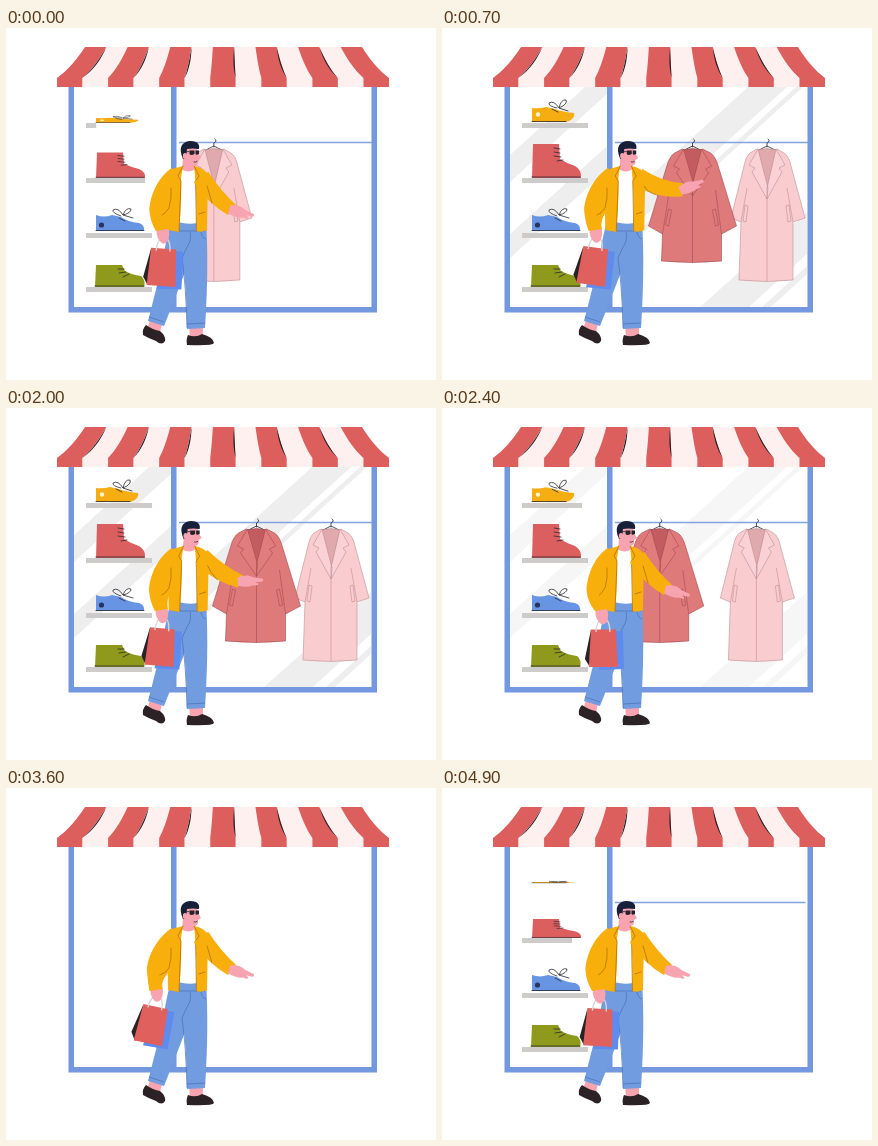
Recreate the animation shown at these times as an HTML page. Size 430x352 px, loop 5000 ms.

```html
<!DOCTYPE html>
<html lang="en">
<head>
<meta charset="utf-8">
<title>Shop window</title>
<style>
html, body { margin: 0; width: 100%; height: 100%; overflow: hidden; background: #fff; }
svg { display: block; width: 100vw; height: 100vh; }
.line { fill: none; stroke: #2b2a33; stroke-width: .8; stroke-linecap: round; stroke-linejoin: round; }
.skin { fill: #f7a3b0; }
.jacket { fill: #f8ae0b; }
.jeans { fill: #719ce0; }
.dark { fill: #2b2226; }
.shelf { fill: #cdcccb; }
.seam { fill: none; stroke: #4a70b5; stroke-width: .7; }
.fold { fill: none; stroke: #a86c08; stroke-width: .7; stroke-linecap: round; }
</style>
</head>
<body>
<svg viewBox="0 0 430 352" preserveAspectRatio="none">
  <defs>
    <clipPath id="glass"><path d="M68 59H165V279H68ZM171 59H365V279H171Z"/></clipPath>
    <clipPath id="room"><path d="M171 59H372V279H171Z"/></clipPath>
  </defs>

  <g id="sheen" clip-path="url(#glass)" fill="#eeeeee">
    <path d="M143 59H165V66L68 154V127Z"/>
    <path d="M165 118V142L68 230V206Z"/>
    <path d="M306 59H345L171 217V182Z"/>
    <path d="M354 59H361L171 232V226Z"/>
    <path d="M365 184V226L307 279H258Z"/>
    <path d="M365 238V246L329 279H320Z"/>
  </g>

  <g id="shelves" class="shelf"></g>
  <g id="shoes">
    <g>
      <path d="M90 80Q97 81 104 79L113 81Q121 84 132 85Q133 88 130 91Q127 94 122 94H90Z" fill="#f6ad12"/>
      <circle cx="96" cy="86.500" r="2.200" fill="#fff3d0"/>
      <path class="line" d="M90 93.500H124M110 81L116 84M115 80Q106 78 107 75Q112 72 117 80Q119 71 124 72Q126 76 117 80L126 83"/>
    </g>
    <g>
      <path d="M91 116H117L118 131Q126 136 133 138Q140 142 139 150H90Z" fill="#dc5f60"/>
      <path class="line" d="M90 149H138M112 120L118 121M112 124L118 125M112 128L119 129M115 133L121 132"/>
    </g>
    <g>
      <path d="M90 187Q98 190 106 187L115 189Q122 194 133 195Q139 197 138 203H90Z" fill="#6795e4"/>
      <circle cx="95.500" cy="197" r="2.600" fill="#26345f"/>
      <path class="line" d="M90 202.500H138M113 190L119 193M115 188Q106 185 107 182Q112 179 117 187Q120 179 125 181Q125 185 117 187L127 190"/>
    </g>
    <g>
      <path d="M90 237H116L119 243Q126 247 135 248Q140 252 138 259H89Z" fill="#8f9a1d"/>
      <path class="line" d="M89 258H138M112 241L118 241M113 245L120 244M117 249L123 246"/>
    </g>
  </g>

  <path id="rack" d="M173 114.500H366" stroke="#83a3de" stroke-width="1.700"/>

  <g clip-path="url(#room)">
    <g id="pink" stroke="#c08d93" stroke-width=".6" fill="#f9cdd0">
      <path class="line" d="M0 119V115Q4 113 1 111M-12 124L0 118L12 124"/>
      <path d="M-10 121L-17 125Q-21 128 -23 138L-36 190L-26 194L-28 252Q0 255 26 252L26 194L38 190L24 138Q22 128 17 125L10 121L0 126Z"/>
      <path d="M-9 122Q0 119 9 122L0 160Z" fill="#e0a9ae"/>
      <path d="M-9 121L-18 137L-12 140L-15 144L0 171L1 160ZM9 121L18 137L12 140L15 144L0 171V160Z" fill="#fad2d5"/>
      <path d="M0 171V253M-26 194L-20 160M26 194L20 160M-22 177L-19 178L-21 194L-24 193ZM22 177L19 178L21 194L24 193Z" fill="none"/>
    </g>
    <g id="red" stroke="#a34a50" stroke-width=".6" fill="#df7a7a">
      <path class="line" d="M0 119V115Q4 113 1 111M-12 124L0 118L12 124"/>
      <path d="M-10 121L-18 125Q-23 128 -26 139L-44 198L-30 206L-31 233Q0 236 29 233L29 206L44 198L26 139Q23 128 18 125L10 121L0 126Z"/>
      <path d="M-9 122Q0 119 9 122L0 156Z" fill="#c35c60"/>
      <path d="M-9 121L-19 138L-13 141L-16 145L0 168L1 156ZM9 121L19 138L13 141L16 145L0 168V156Z" fill="#e07d7c"/>
      <path d="M0 168V235M-30 206L-23 162M29 206L23 162M-24 181L-21 182L-24 198L-27 197ZM23 181L20 182L23 198L26 197Z" fill="none"/>
    </g>
  </g>

  <path d="M62.500 59H68V279H165V59H170.500V279H365.500V59H371V284.500H62.500Z" fill="#7398e0"/>
  <g id="awning"></g>

  <path class="skin" d="M144 292L156 296L154 304L141 302ZM183 296H197V310H184Z"/>
  <path class="dark" d="M140 297Q147 302 154 303Q160 308 159 313Q156 318 150 313Q142 310 137 307Q136 301 140 297ZM182 307Q190 310 196 306Q207 309 208 315Q207 318 181 317Q180 311 182 307Z"/>
  <path class="jeans" d="M165 194H186L188 220Q174 258 158 298L142 293Q151 260 158 226Q161 206 165 194Z"/>
  <path class="jeans" d="M172 194H200Q203 238 199 300L181 301Q181 262 176 226Z"/>
  <path class="seam" d="M184 204Q186 212 181 219L176 230Q180 258 181 300M170 203H199M181 296L199 295M143 289L158 294M195 204Q196 210 200 211"/>

  <g id="torso">
    <path class="skin" d="M177 130H189V143Q183 149 176 143Z"/>
    <path d="M174 140Q183 147 190 140L191 195Q182 197 172 194Z" fill="#fff"/>
    <path class="jacket" d="M177 138Q167 140 161 144L162 202L173 204Q176 170 175 150Z"/>
    <path class="jacket" d="M188 138Q199 140 202 147L201 202Q196 205 190 203Q191 170 189 148Z"/>
    <path class="fold" d="M177 138L172 148L175 153L173 203M188 138L193 148L189.500 153L190.500 203M193 186L199 184"/>
    <path class="skin" d="M178 118H191L192 125L195 130L192 132Q193 138 187 138Q179 137 177 130Z"/>
    <path d="M177 131Q173 122 176 117Q181 111 190 114Q194 116 193 121Q186 120 181 121L180 130Z" fill="#172038"/>
    <ellipse class="skin" cx="179" cy="128" rx="2.200" ry="3"/>
    <path d="M183.500 122.500H188.500V126Q185 128 183.500 126ZM189.500 122.500H193V126Q190 127.500 189.500 126Z" fill="#26222b"/>
    <path class="line" d="M179 124L183 123.500M188 134Q189.500 134.500 191 133.500"/>
    <path id="reachSleeve" class="jacket"/>
    <path id="reachFold" class="fold"/>
  </g>
  <path id="hand" class="skin" d="M-3 -4C4 -6 8 -6 13 -3L22 -1Q24 1 21 2L15 2L18 4Q17 6 12 5Q6 7 -3 4Z"/>

  <g id="bag">
    <path d="M4 13L20 12L21 50L-4 51Z" fill="#5e8bef"/>
    <path d="M-12 11L-18 40L-13 48L-8 46Z" fill="#2b2226"/>
    <path d="M-12 10.500H13L15 48H-14Z" fill="#df605d"/>
    <path d="M-7 13Q-6 0 0 -1Q7 0 7 13" fill="none" stroke="#d9d4d6" stroke-width="1.300"/>
  </g>
  <path id="fist" class="skin" d="M-6 -10L4 -11Q8 -4 5 4Q1 9 -3 4Q-8 -2 -6 -10Z"/>
  <path id="bagSleeve" class="jacket"/>
  <path id="bagFold" class="fold"/>
</svg>

<script>
const LOOP = 5000, STEP = 100;
const $ = id => document.getElementById(id);
const set = (el, name, value) => el.setAttribute(name, value);
const clamp = x => Math.min(1, Math.max(0, x));
const mix = (a, b, k) => a + (b - a) * k;
const smooth = k => k * k * (3 - 2 * k);

function add(parent, attrs) {
  const el = document.createElementNS('http://www.w3.org/2000/svg', 'path');
  for (const name in attrs) set(el, name, attrs[name]);
  parent.append(el);
  return el;
}

// Awning: stripes flare outward from the top edge
function edge(i) {
  const top = 79 + i * 277 / 13, low = 51 + i * 332 / 13, d = low - top;
  const upper = shift => `${top + d * .28 + shift} 31`;
  const lower = shift => `${top + d * .6 + shift} 42`;
  return { top, low,
    down: `C${upper(0)} ${lower(0)} ${low} 50`,
    up: (shift = 0) => `C${lower(shift)} ${upper(shift)} ${top} 19` };
}
for (let i = 0; i < 13; i++) {
  const a = edge(i), b = edge(i + 1);
  add($('awning'), { fill: i % 2 ? '#fdf0ee' : '#dd5f5d',
    d: `M${a.top} 19${a.down}V59H${b.low}V50${b.up()}Z` });
}
for (let i = 1; i < 13; i += 2) {
  const e = edge(i);
  add($('awning'), { fill: '#2b2226', d: `M${e.top} 19${e.down}${e.up(i < 7 ? 1.8 : -1.8)}Z` });
}

// Presence from 0 to 1: leaves at out, returns at back (may lie past the loop end)
function life(t, out, outDur, back, backDur, power = 2) {
  const rise = x => 1 - (1 - clamp((x - back) / backDur)) ** power;
  if (t < out) return rise(t + LOOP);
  return Math.max(1 - clamp((t - out) / outDur) ** power, rise(t));
}

// Smooth curve through [time, value] pairs
function track(keys, t) {
  let i = 0;
  while (i < keys.length - 2 && t >= keys[i + 1][0]) i++;
  const [t0, a] = keys[i], [t1, b] = keys[i + 1];
  return mix(a, b, smooth(clamp((t - t0) / (t1 - t0))));
}

const shelfY = [95, 150, 205, 259];
const shelfLife = [[2280, 400, 4952, 600], [2570, 407, 4600, 590], [2770, 400, 4250, 590], [2970, 400, 3900, 590]];
const shoeLife = [[2350, 480, 4875, 700], [2550, 350, 4700, 600], [2750, 400, 4330, 600], [2950, 420, 4000, 600]];
const shelves = shelfY.map(() => add($('shelves'), {}));
const shoes = [...$('shoes').children];

const swingKeys = [[0, .3], [700, .6], [1400, 1], [2450, 0], [2800, .08], [3700, .95], [4000, 1], [4800, .25], [5000, .3]];
const reachKeys = [[200, 0], [1050, 2], [1600, 2], [2250, 0]];

// elbow, wrist, hand angle for low, level and raised arm
const poses = [
  [209, 168, 226, 182, 13],
  [217, 163, 239, 169, -14],
  [223, 153, 246, 141, -54]
];

function sleeve(points, widths) {
  const [s, e, w] = points;
  const normal = (a, b) => {
    const x = b[0] - a[0], y = b[1] - a[1], l = Math.hypot(x, y);
    return [-y / l, x / l];
  };
  const bend = e.map((v, j) => 1.5 * v - (s[j] + w[j]) / 4);
  const path = [s, bend, w], n = [normal(s, e), normal(s, w), normal(e, w)];
  const at = (i, side) => path[i].map((v, j) => v + side * n[i][j] * widths[i]).join(' ');
  return `M${at(0, -1)}Q${at(1, -1)} ${at(2, -1)}L${at(2, 1)}Q${at(1, 1)} ${at(0, 1)}Z`;
}

function drawReach(r) {
  const i = r < 1 ? 0 : 1;
  const [ex, ey, wx, wy, turn] = poses[i].map((v, j) => mix(v, poses[i + 1][j], r - i));
  const dx = r;
  set($('torso'), 'transform', `translate(${dx})`);
  const arm = [[195, 149], [ex - dx, ey], [wx - dx, wy]];
  set($('reachSleeve'), 'd', sleeve(arm, [9, 9, 6.5]));
  set($('reachFold'), 'd', `M201 158Q203 164 ${ex - dx - 3} ${ey + 7}`);
  set($('hand'), 'transform', `translate(${wx} ${wy}) rotate(${turn})`);
}

function drawBagArm(s) {
  const x = 161 - 10.5 * s, y = 211 - 3 * s;
  set($('bag'), 'transform', `translate(${x} ${y}) rotate(${13 * s})`);
  set($('fist'), 'transform', `translate(${x - 1} ${y - 1}) rotate(${8 * s})`);
  const el = 144.5 - 4 * s, wx = x - 8;
  set($('bagSleeve'), 'd', `M166 140C153 148 ${el + 1} 166 ${el} 182Q${el + 1} 194 ${wx} 203L${wx + 13} 201Q${wx + 11} 191 166 181L174 152Z`);
  set($('bagFold'), 'd', `M165 160Q166 170 163 180Q159 186 ${el + 13} 187`);
}

function drawCoat(id, x) {
  set($(id), 'transform', `translate(${x})`);
  set($(id), 'visibility', x < 158 ? 'hidden' : 'visible');
}

function draw(t) {
  shelves.forEach((el, i) => {
    const w = 66 * life(t, ...shelfLife[i]);
    set(el, 'd', `M80 ${shelfY[i]}h${w}v5h${-w}Z`);
  });
  shoes.forEach((el, i) => {
    const k = life(t, ...shoeLife[i]);
    set(el, 'transform', `translate(0 ${shelfY[i] * (1 - k)}) scale(1 ${k})`);
    set(el, 'visibility', k < .01 ? 'hidden' : 'visible');
  });
  set($('rack'), 'd', `M173 114.5h${193 * life(t, 2640, 590, 4440, 600, 3)}`);
  drawCoat('pink', mix(155, 325, life(t, 2150, 630, 4930, 600, 3)));
  drawCoat('red', mix(155, 250.5, life(t, 2050, 500, 5050, 550, 3)));
  set($('sheen'), 'opacity', life(t, 2200, 400, 5300, 400, 1));
  drawReach(track(reachKeys, t));
  drawBagArm(track(swingKeys, t));
}

const start = performance.now();
function tick() {
  const t = (performance.now() - start) % LOOP;
  draw(Math.floor(t / STEP) * STEP);
  requestAnimationFrame(tick);
}
tick();
</script>
</body>
</html>
```
